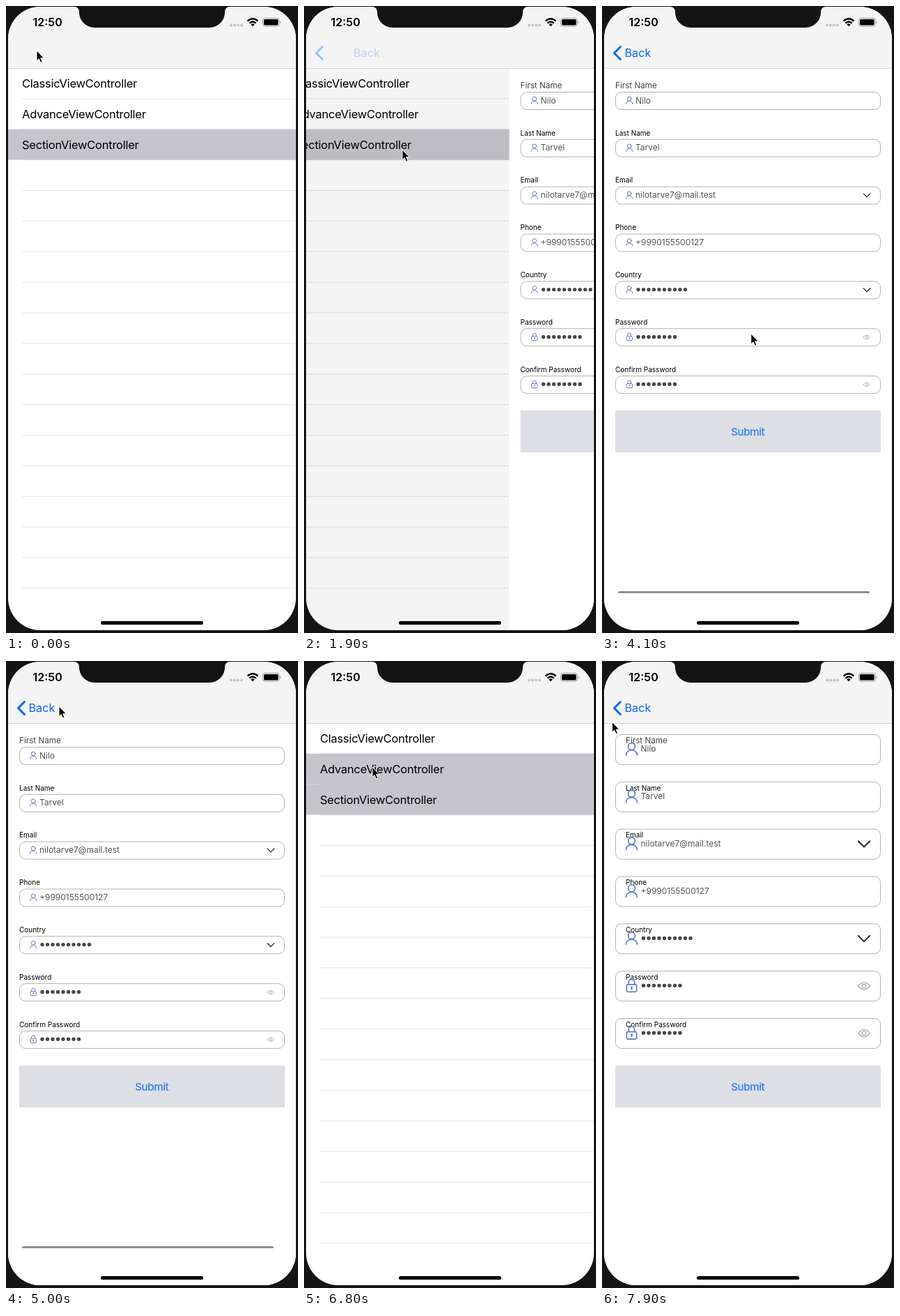
Animation, 419 px wide and 899 px high, one loop 8 s. Source, as an HTML page:

```html
<!DOCTYPE html>
<html lang="en">
<head>
<meta charset="utf-8">
<style>
  html, body { margin: 0; width: 100%; height: 100%; overflow: hidden; background: #141414; }
  svg { display: block; width: 419px; height: 899px; font-family: Inter, Roboto, sans-serif; }
  .row { font-size: 16.5px; letter-spacing: -.25px; }
  .label { font-size: 10px; }
  .first { font-size: 11.7px; fill: #444; }
  .value { font-size: 12px; fill: #555; }
  .line { fill: none; stroke-linecap: round; stroke-linejoin: round; }
</style>
</head>
<body>
<svg viewBox="0 0 419 899">
  <defs>
    <clipPath id="screen"><rect x="3" y="1" width="413" height="894" rx="46"/></clipPath>
    <g id="person" class="line" stroke="#647bcf" stroke-width="1">
      <circle cy="-2.2" r="2.9"/><path d="M-4.7 5.2C-4.7-.5 4.7-.5 4.7 5.2"/>
    </g>
    <g id="lock" class="line" stroke="#647bcf" stroke-width="1">
      <rect x="-4.2" y="-.9" width="8.4" height="6.2" rx="1.3"/>
      <path d="M-2.5-.9V-2.8A2.5 2.5 0 0 1 2.5-2.8V-.9M0 1.6V3.2"/><circle cy="1.6" r=".4"/>
    </g>
    <path id="chevron" class="line" stroke="#333" stroke-width="1.3" d="M-4.8-2.4 0 2.4 4.8-2.4"/>
    <g id="eye" class="line" stroke="#b0b0b0" stroke-width=".8">
      <path d="M-5 0Q0-6 5 0Q0 6-5 0Z"/><circle r="1.6"/>
    </g>
  </defs>

  <g clip-path="url(#screen)">
    <rect width="419" height="899" fill="#fff"/>
    <g id="list"></g>
    <rect id="dim" y="89" width="419" height="810"/>
    <g id="page">
      <rect x="3" y="89" width="413" height="810" fill="#fff"/>
      <g id="compact"></g>
      <g id="tall"></g>
      <rect x="19" y="580" width="381" height="60" fill="#dedee5"/>
      <text x="209.3" y="615.5" text-anchor="middle" font-size="15" font-weight="500" letter-spacing="-.35" fill="#2b7bf6">Submit</text>
      <rect id="bar" x="23" y="839" width="361" height="3" rx="1.5" fill="#919191"/>
    </g>
    <rect width="419" height="89" fill="#f4f4f4"/>
    <rect y="89" width="419" height="1" fill="#d4d4d4"/>
    <path id="arrow" class="line" stroke="#0b68f8" stroke-width="3" d="M26.5 58.5 17.5 67.5 26.5 76.5"/>
    <text id="back" y="73" font-size="16.2" fill="#0b68f8">Back</text>
    <text x="38.5" y="29.3" font-size="16" font-weight="600">12:50</text>
    <g fill="#c4c4c4">
      <circle cx="323" cy="27.5" r="2"/><circle cx="328" cy="27.5" r="2"/>
      <circle cx="333" cy="27.5" r="2"/><circle cx="338" cy="27.5" r="2"/>
    </g>
    <g fill="none" stroke="#000" stroke-width="2.4">
      <path d="M346.6 21.6Q354 14.8 361.4 21.6M349.3 24.7Q354 20.4 358.7 24.7"/>
      <path d="M351.3 26.4Q354 24.2 356.7 26.4L354 29.2Z" fill="#000" stroke="none"/>
    </g>
    <rect x="368.5" y="17.5" width="23.5" height="11.5" rx="3" fill="none" stroke="#999"/>
    <rect x="370" y="19" width="20.5" height="8.5" rx="1.6"/>
    <path d="M393.3 21.3Q395.6 23.2 393.3 25.2Z" fill="#999"/>
    <path fill="#141414" d="M98 0V1A7 7 0 0 1 105 8V9A22 22 0 0 0 127 31H292A22 22 0 0 0 314 9V8A7 7 0 0 1 321 1V0Z"/>
    <rect x="136" y="882" width="147" height="5" rx="2.5"/>
  </g>
  <path id="cursor" stroke="#fff" stroke-width="1" d="M0 0V14.5L3.2 11.7 5.6 16.9 8 15.8 5.7 10.7H10.4Z"/>
</svg>
<script>
const $ = id => document.getElementById(id);
const set = (id, name, value) => $(id).setAttribute(name, value);
const TOP = 89, ROW = 43.87, STEP = 67.83;

const text = (x, y, cls, s) => `<text x="${x}" y="${y}" class="${cls}">${s}</text>`;
const icon = (name, x, y, scale) => `<use href="#${name}" transform="translate(${x} ${y}) scale(${scale})"/>`;

function buildList() {
  let out = '';
  for (let i = 1; i <= 17; i++)
    out += `<rect x="23" y="${TOP + ROW * i - .5}" width="393" height="1" fill="#e2e2e4"/>`;
  const fill = (i, id) =>
    `<rect id="${id}" x="3" y="${TOP + ROW * i}" width="413" height="${ROW}" fill="#c6c5cc"/>`;
  out += fill(1, 'pressed') + fill(2, 'selected');
  ['Classic', 'Advance', 'Section'].forEach((name, i) => {
    out += text(23, TOP + ROW * i + 28.2, 'row', name + 'ViewController');
  });
  return out;
}

const fields = [
  ['First Name', 'Nilo', 'person'],
  ['Last Name', 'Tarvel', 'person'],
  ['Email', 'nilotarve7@mail.test', 'person', 'chevron'],
  ['Phone', '+9990155500127', 'person'],
  ['Country', 10, 'person', 'chevron'],
  ['Password', 8, 'lock', 'eye'],
  ['Confirm Password', 8, 'lock', 'eye']
];

function buildForm({ boxY, height, labelX, valueX, iconX, midY, endX, endY, scale }) {
  return fields.map(([label, value, left, right], i) => {
    const y = STEP * i;
    let out = `<rect x="19.5" y="${boxY + y}" width="380" height="${height}" rx="8.5" fill="none" stroke="#b4b4b4"/>`;
    out += text(labelX, (i ? 117.7 : 118.4) + y, i ? 'label' : 'label first', label);
    out += icon(left, iconX, midY + y, scale);
    if (right) out += icon(right, endX, endY + y, scale);
    if (typeof value === 'string') return out + text(valueX, midY + y + 4.2, 'value', value);
    for (let k = 0; k < value; k++)
      out += `<circle cx="${valueX + 4 + 7.5 * k}" cy="${midY + y}" r="2.7" fill="#484848"/>`;
    return out;
  }).join('');
}

$('list').innerHTML = buildList();
$('compact').innerHTML = buildForm({
  boxY: 123.5, height: 25, labelX: 19, valueX: 48, iconX: 39.2, midY: 135.3, endX: 380, endY: 135.8, scale: 1
});
$('tall').innerHTML = buildForm({
  boxY: 105.5, height: 43, labelX: 34, valueX: 55.5, iconX: 42.5, midY: 126.2, endX: 376, endY: 126.8, scale: 1.7
});

const clamp = v => Math.max(0, Math.min(1, v));

// Critically damped spring, settled at the end of its duration
function spring(t, start, duration) {
  const u = 6 * clamp((t - start) / duration);
  return (1 - (1 + u) * Math.exp(-u)) / (1 - 7 * Math.exp(-6));
}

const path = [
  [300, 44, 64], [1200, 148, 179], [1400, 141, 206], [2900, 141, 206], [3000, 140, 209],
  [3800, 226, 506], [3950, 226, 506], [4800, 80, 76], [5000, 76, 65], [5100, 63, 64],
  [6000, 63, 64], [6300, 98, 152], [7700, 98, 152], [7900, 14.5, 87.5]
];

function cursorAt(t) {
  const next = path.findIndex(key => key[0] > t);
  if (next < 1) return path[next ? path.length - 1 : 0].slice(1);
  const [t0, x0, y0] = path[next - 1], [t1, x1, y1] = path[next];
  const u = (t - t0) / (t1 - t0), e = u * u * (3 - 2 * u);
  return [x0 + (x1 - x0) * e, y0 + (y1 - y0) * e];
}

function draw() {
  const t = performance.now() % 8000;
  const shown = spring(t, 1858.3, 240) - spring(t, 5351, 300) + spring(t, 6900, 200);
  const second = t > 6000;

  set('list', 'transform', `translate(${-124 * shown})`);
  set('dim', 'opacity', .14 * shown);
  set('page', 'transform', `translate(${413 * (1 - shown)})`);
  set('compact', 'visibility', second ? 'hidden' : 'visible');
  set('tall', 'visibility', second ? 'visible' : 'hidden');
  set('bar', 'opacity', second ? 0 : clamp((t - 3900) / 200));
  set('pressed', 'opacity', t >= 6500 ? 1 : 0);
  set('arrow', 'opacity', clamp(1.3 * shown));
  set('back', 'opacity', shown * (.7 + .3 * shown));
  set('back', 'x', 32.5 + 38.5 * clamp(1.45 * (1 - shown)));
  set('cursor', 'transform', `translate(${cursorAt(t)})`);
  requestAnimationFrame(draw);
}
draw();
</script>
</body>
</html>
```
